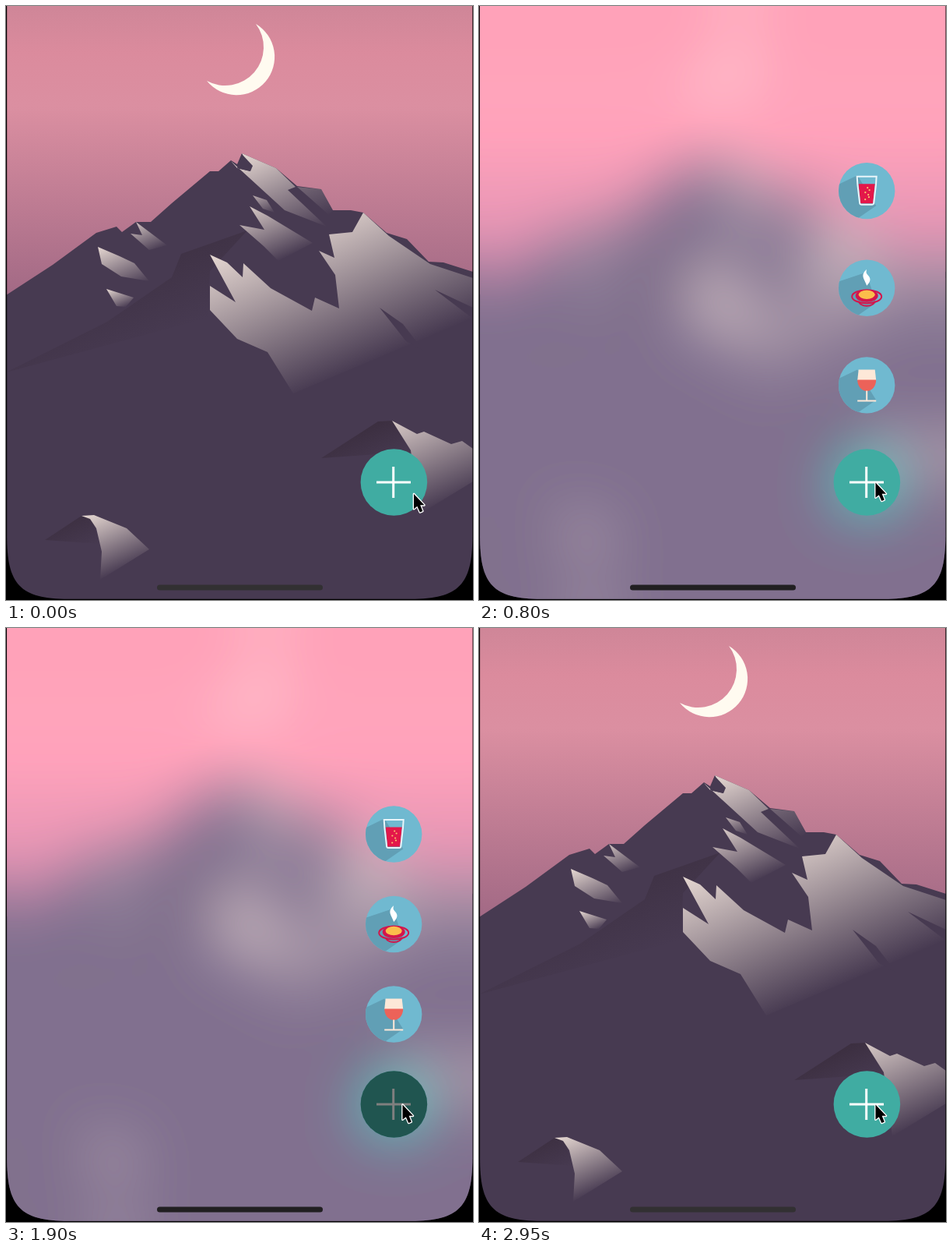
An HTML page with a canvas for the animation above (3 s loop, 600 px wide and 762 px high).

```html
<!DOCTYPE html>
<html lang="en">
<head>
<meta charset="utf-8">
<title>Floating menu</title>
<style>
html, body { margin: 0; width: 100%; height: 100%; overflow: hidden; background: #000; }
canvas { display: block; }
</style>
</head>
<body>
<canvas id="stage" width="600" height="762"></canvas>
<script>
const W = 600, H = 762, LOOP = 3000, STEP = 50, PAD = 120, TAU = Math.PI * 2;
const ctx = document.getElementById('stage').getContext('2d');
const BTN = { x: 498.4, y: 611, r: 42.8 };
const ROCK = '#473a51', SNOW = '230,216,210', SHADE = '55,42,57';
const LIGHT = [.4, .917]; // direction in which every slope fades

const OPEN = 475, CLOSE = 1915, PRESS = 120, FROST = 100;

function layer(w, h) {
  const c = document.createElement('canvas');
  c.width = w;
  c.height = h;
  return c.getContext('2d');
}

function shape(g, d, fill) {
  g.fillStyle = fill;
  g.fill(new Path2D(d));
}

function line(g, d, color, width) {
  g.strokeStyle = color;
  g.lineWidth = width;
  g.stroke(new Path2D(d));
}

function disc(g, x, y, r, fill) {
  g.beginPath();
  g.arc(x, y, r, 0, TAU);
  g.fillStyle = fill;
  g.fill();
}

// Slope that fades along LIGHT, from its first to its last point in that direction
function slope(g, points, alpha = 1, rgb = SNOW) {
  const depth = points.split(' ').map(p => {
    const [x, y] = p.split(',').map(Number);
    return x * LIGHT[0] + y * LIGHT[1];
  });
  const a = Math.min(...depth), b = Math.max(...depth);
  const grad = g.createLinearGradient(a * LIGHT[0], a * LIGHT[1], b * LIGHT[0], b * LIGHT[1]);
  grad.addColorStop(0, `rgba(${rgb},${alpha})`);
  grad.addColorStop(1, `rgba(${rgb},0)`);
  shape(g, `M${points}Z`, grad);
}

function drawScene(g) {
  const sky = g.createLinearGradient(0, 0, 0, 380);
  sky.addColorStop(0, '#cf8698');
  sky.addColorStop(.16, '#db8b9d');
  sky.addColorStop(.34, '#db8fa1');
  sky.addColorStop(1, '#a06884');
  g.fillStyle = sky;
  g.fillRect(0, 0, W, H);

  shape(g, 'M321 23A49 49 0 1 1 258 96A49.3 49.3 0 0 0 321 23Z', '#fffbf0');

  shape(g, 'M0,371 60,332 116,291 142,283 149,290 167,277 186,277 213,253 262,212 273,212 289,198 297,203 ' +
    '303,189 347,208 374,231 405,235 420,262 443,262 459,265 489,291 515,299 543,328 562,329 600,341 ' +
    '600,762 0,762Z', ROCK);

  slope(g, '310,288 225,318 213,348 130,405 0,470 260,400 262,340', .45, SHADE);
  slope(g, '405,580 478,533 496,532 521,572', .7, SHADE);
  slope(g, '50,685 97,654 110,656 121,690', .6, SHADE);

  // summit
  slope(g, '289,199 297,208 314,212 303,189 347,208 372,232 362,236 412,283 358,262');
  shape(g, 'M303,190 317,205 314,212 297,208Z', ROCK);
  slope(g, '374,232 405,235 420,262 415,268', .28);
  slope(g, '317,243 335,249 345,265 330,260', .7);
  slope(g, '313,257 336,269 394,304 350,327 331,308 300,281 332,287', .9);

  // large snow field
  slope(g, '262,319 284,329 304,348 305,330 340,362 393,391 397,374 428,388 423,345 402,314 422,323 415,293 ' +
    '445,290 459,265 492,295 545,331 600,349 600,400 369,497 336,444 297,427 262,390 262,359 295,380');
  shape(g, 'M480,387 510,408 536,442 514,430Z', ROCK);
  shape(g, 'M551,364 600,387 600,401Z', ROCK);

  // left ridges
  slope(g, '118,309 146,321 165,330 184,353 148,347 123,331');
  slope(g, '167,277 207,307 184,313 160,292 175,294', .85);
  slope(g, '129,363 164,374 154,386 142,385');

  // foothills
  slope(g, '97,654 113,653 155,670 184,697 121,736 123,700 116,670 108,658');
  slope(g, '496,532 528,549 537,546 572,562 586,558 600,568 600,610 531,652 520,570', .9);
}

function drawButton(g, pressed) {
  disc(g, BTN.x, BTN.y, BTN.r, '#40aca2');
  line(g, 'M476 611H520M497.7 591V631', '#fff', 3);
  if (pressed) disc(g, BTN.x, BTN.y, BTN.r, 'rgba(0,0,0,.5)');
}

const scene = layer(W, H);
drawScene(scene);

// Frosted copy: whitened, blurred and saturated, on a margin that hides the blur's edge
function frost() {
  const w = W + 2 * PAD, h = H + 2 * PAD, base = layer(w, h), out = layer(W, H);
  base.drawImage(scene.canvas, 0, 0, w, h);
  base.drawImage(scene.canvas, PAD, 0, W, h);
  base.drawImage(scene.canvas, 0, PAD, w, H);
  base.drawImage(scene.canvas, PAD, PAD);
  base.translate(PAD, PAD);
  drawButton(base, false);
  base.fillStyle = 'rgba(255,255,255,.29)';
  base.fillRect(-PAD, -PAD, w, h);
  out.filter = 'blur(38px) saturate(1.8)';
  out.drawImage(base.canvas, -PAD, -PAD);
  return out.canvas;
}
const frosted = frost();

function juice(g) {
  shape(g, 'M-10.5-9H10.5L8 16H-8Z', '#e3174a');
  line(g, 'M-12.5-18.5H12.5L11.8-8 9 16Q8.8 17.6 7 17.6H-7Q-8.8 17.6-9 16L-11.8-8Z', '#e9f5fa', 2);
  for (let i = 0; i < 6; i++) disc(g, 1 + 3 * Math.sin(i * 2.2), 3 * i - 4, 1.1, '#fbc26c');
}

function soup(g) {
  shape(g, 'M0-24C-9-16-3-12 0-3C7-10 4-14 1-17C-1-19-1-21 0-24Z', '#fff');
  const oval = (y, rx, ry, end = TAU) => {
    g.beginPath();
    g.ellipse(0, y, rx, ry, 0, 0, end);
  };
  g.strokeStyle = g.fillStyle = '#d3164c';
  g.lineWidth = 2;
  oval(11, 19, 8.5);
  g.stroke();
  oval(17, 10, 6, Math.PI);
  g.stroke();
  oval(10, 14.5, 8);
  g.fill();
  oval(8.5, 10.5, 5.8);
  g.fillStyle = '#fbbd4b';
  g.fill();
}

function wine(g) {
  shape(g, 'M-10.5-20H10.5L12-6.5H-12Z', '#fde8d8');
  shape(g, 'M-12-7H12C12 2 6 7.5 0 7.5S-12 2-12-7Z', '#ec6259');
  line(g, 'M0 7V20M-12 20H12', '#fde8d8', 2);
}

// Back to front; the first one travels farthest
const items = [juice, soup, wine];

function drawItem(art, y) {
  ctx.save();
  ctx.translate(498.2, y);
  disc(ctx, 0, 0, 36.2, '#70b9d0');
  ctx.clip();
  shape(ctx, `M${art === soup ? -1 : -12}-20L-37-8V37H-14L12 19Z`, '#619fb5');
  art(ctx);
  ctx.restore();
}

// Damped spring from 0 to 1: response .6 s, damping .6
function spring(ms) {
  if (ms <= 0) return 0;
  const x = ms / 1000 * TAU / .6;
  return 1 - Math.exp(-.6 * x) * (Math.cos(.8 * x) + .75 * Math.sin(.8 * x));
}

const ramp = (t, from, span) => Math.min(1, Math.max(0, (t - from) / span));
const smooth = p => p * p * (3 - 2 * p);

function drawCursor(x, y) {
  ctx.save();
  ctx.translate(x, y);
  ctx.scale(.87, .87);
  const d = 'M0 0V22L5 18 9 27 13 25.3 9.4 16.5H15.5Z';
  ctx.lineJoin = 'round';
  line(ctx, d, '#fff', 3);
  shape(ctx, d, '#000');
  ctx.restore();
}

const screen = new Path2D('M1.2-2H599.3V680C599.3 742 582 760.7 520 760.7H80C18 760.7 1.2 742 1.2 680Z');

function render(t) {
  const veil = ramp(t, OPEN - 25, FROST) * (1 - ramp(t, CLOSE + 560, FROST));
  const gap = 115.5 * (spring(t - OPEN) - spring(t - CLOSE));
  const pressed = [OPEN, CLOSE].some(up => t >= up - PRESS && t < up);

  ctx.fillStyle = '#000';
  ctx.fillRect(0, 0, W, H);
  ctx.save();
  ctx.clip(screen);
  ctx.drawImage(scene.canvas, 0, 0);
  ctx.globalAlpha = veil;
  ctx.drawImage(frosted, 0, 0);
  ctx.globalAlpha = 1;
  if (veil > 0) items.forEach((art, i) => drawItem(art, BTN.y - (items.length - i) * gap));
  drawButton(ctx, pressed);

  const dim = Math.round(50 - 17 * veil);
  ctx.lineCap = 'round';
  line(ctx, 'M197.5 746H403.5', `rgb(${dim},${dim - 2},${dim})`, 7);
  ctx.restore();

  const move = 14.5 * (1 - smooth(ramp(t, 0, 300)));
  drawCursor(509.5 + move, 611.5 + move);
}

const start = performance.now();
function tick() {
  const t = (performance.now() - start) % LOOP;
  render(Math.floor(t / STEP) * STEP);
  requestAnimationFrame(tick);
}
tick();
</script>
</body>
</html>
```
